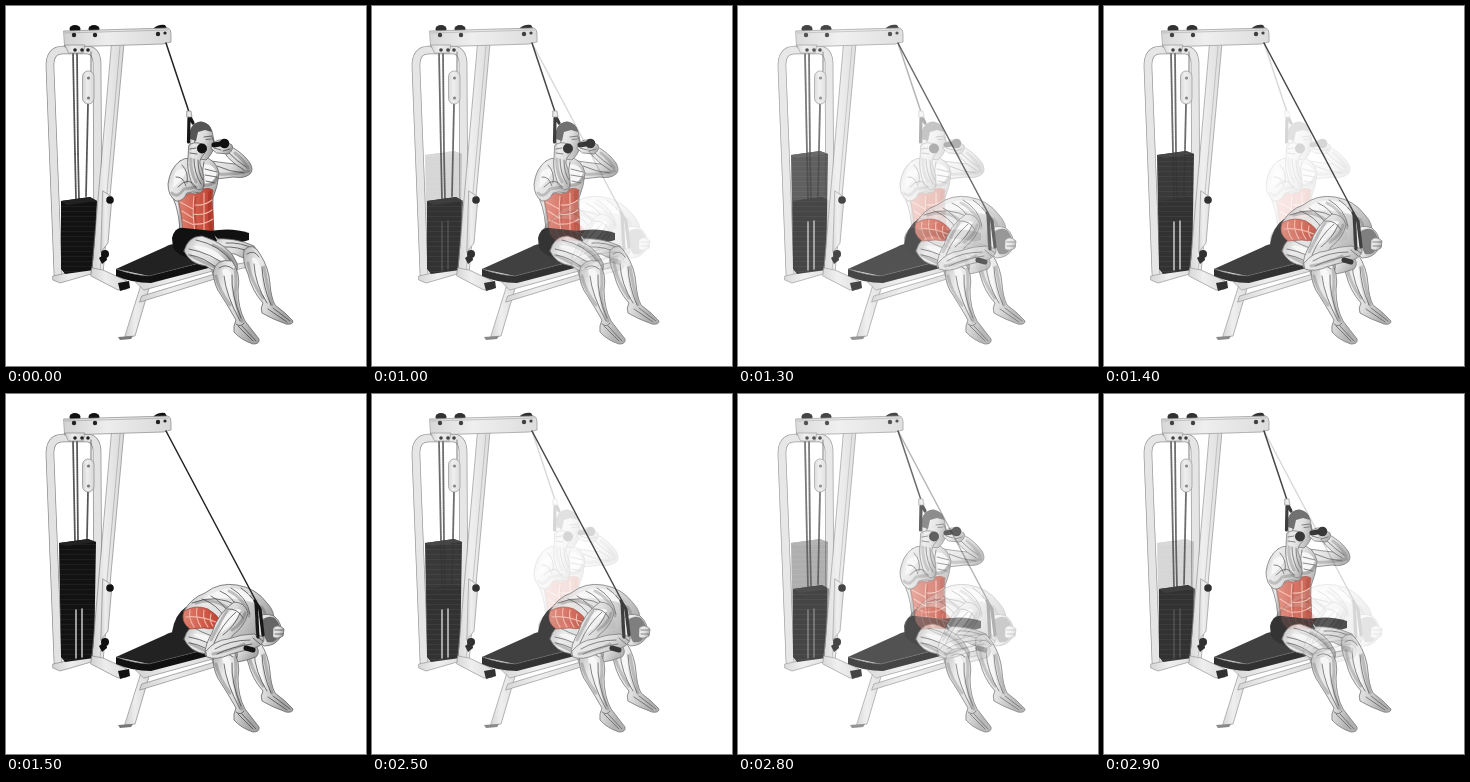
An HTML page for the animation above (3 s loop, 360 px wide and 360 px high).

```html
<!DOCTYPE html>
<html lang="en">
<head>
<meta charset="utf-8">
<title>Seated cable crunch</title>
<style>
  html, body { margin: 0; width: 100%; height: 100%; overflow: hidden; background: #fff; }
  path { stroke-linejoin: round; stroke-linecap: round; }
  .steel { fill: url(#steel); stroke: #888; stroke-width: .7; }
  .tube { fill: none; stroke: #888; stroke-width: 8.6; }
  .tube + .tube { stroke: #e2e2e2; stroke-width: 7.2; }
  .black { fill: #111; }
  .skin { fill: url(#skin); stroke: #666; stroke-width: .8; }
  .pale { fill: #f6f6f6; }
  .shade { fill: none; stroke: #444; stroke-opacity: .3; stroke-width: 3; }
  .line { fill: none; stroke: #444; stroke-width: .75; }
  .red { fill: url(#red); stroke: #8a3a30; stroke-width: .6; }
  .redline { fill: none; stroke: #f3b5a6; stroke-width: 1.1; }
  .wire { fill: none; stroke: #222; stroke-width: 1.5; }
  .rope { fill: none; stroke: #161616; stroke-width: 3.2; }
  .grip { fill: none; stroke: #111; stroke-width: 5; }
  .chain { fill: none; stroke: #555; stroke-width: 1.8; stroke-dasharray: 1.6 .8; }
  .chain path { stroke-linecap: butt; }
  .rod { stroke: #c9c9c9; stroke-width: 1.5; }

  @property --bent { syntax: "<number>"; inherits: true; initial-value: 0; }
  svg { display: block; width: 100vw; height: 100vh; animation: dissolve 3s step-end infinite; }
  /* Both poses are translucent over white during the dissolve */
  #upright { opacity: calc(1 - var(--bent)); }
  #bent { opacity: var(--bent); }
  @keyframes dissolve {
    0% { --bent: 0; }
    33.333% { --bent: .1667; }
    36.666% { --bent: .3333; }
    40% { --bent: .5; }
    43.333% { --bent: .6667; }
    46.666% { --bent: .8333; }
    50% { --bent: 1; }
    83.333% { --bent: .8333; }
    86.666% { --bent: .6667; }
    90% { --bent: .5; }
    93.333% { --bent: .3333; }
    96.666% { --bent: .1667; }
    100% { --bent: 0; }
  }
</style>
</head>
<body>
<svg viewBox="0 0 360 360">
  <defs>
    <linearGradient id="steel"><stop stop-color="#d2d2d2"/><stop offset=".4" stop-color="#ededed"/><stop offset="1" stop-color="#d8d8d8"/></linearGradient>
    <linearGradient id="skin" x2="1" y2=".4"><stop stop-color="#b0b0b0"/><stop offset=".3" stop-color="#e9e9e9"/><stop offset=".65" stop-color="#dadada"/><stop offset="1" stop-color="#a5a5a5"/></linearGradient>
    <linearGradient id="red"><stop stop-color="#dd8272"/><stop offset=".55" stop-color="#cf5a49"/><stop offset="1" stop-color="#b8402f"/></linearGradient>
    <pattern id="plates" width="40" height="5" patternUnits="userSpaceOnUse"><path fill="#121212" d="M0 0H40V5H0Z"/><path d="M0 .5H40" stroke="#242424" stroke-width=".7"/></pattern>

    <g id="rear">
      <path class="tube" d="M52 268L44 62Q43 44 57 44L82 44Q90 45 91 56L92 262"/>
      <path class="tube" d="M52 268L44 62Q43 44 57 44L82 44Q90 45 91 56L92 262"/>
      <path class="steel" d="M47 270L84 262L92 266L54 277L47 274Z"/>
      <path class="chain" d="M67 46L69 148M71 46L72 148M82 98L80 190"/>
      <path class="line" d="M85 46V66"/>
    </g>

    <g id="front">
      <rect class="steel" x="76.5" y="65" width="11.5" height="33" rx="5.7"/>
      <circle cx="82.5" cy="72" r="1.6" fill="#777"/><circle cx="82.5" cy="92" r="1.6" fill="#777"/>
      <path class="steel" d="M106 37L118 37L97 267L86 267Z"/>
      <path class="line" d="M114 40L94 266" style="stroke:#aaa"/>
      <path class="steel" d="M97 185L106 191L102 237L95 246Z"/>
      <path class="steel" d="M86 262L97 264L121 275V283L112 284L85 270Z"/>
      <path class="black" d="M112 277L123 275L124 282L114 285Z"/>
      <ellipse class="black" cx="69" cy="23" rx="5.5" ry="4"/><ellipse class="black" cx="88" cy="23" rx="5.5" ry="4"/>
      <path class="black" d="M147 23Q152 18 159 19L162 24Z"/>
      <path class="steel" d="M58 25L162 22Q165 23 165 28V36L157 38L59 41Z"/>
      <path class="line" d="M59 27L162 24" style="stroke:#aaa"/>
      <path class="steel" d="M59 39H79L77 47H63Z"/>
      <g fill="#222"><circle cx="68" cy="29" r="2.2"/><circle cx="89" cy="29" r="2.2"/><circle cx="152" cy="28" r="2.2"/><circle cx="159" cy="27" r="1.6"/><circle cx="69" cy="44" r="1.8"/><circle cx="76" cy="44" r="1.8"/><circle cx="82" cy="44" r="1.8"/></g>
      <circle class="black" cx="104" cy="194" r="3.8"/><circle class="black" cx="99" cy="248" r="4"/>
      <path class="black" d="M93 252L100 247L101 254L96 258Z"/>
      <path class="steel" d="M135 280L144 279L129 330L119 331Z"/>
      <path class="steel" d="M136 290L212 267V272L134 296Z"/>
      <path class="steel" d="M130 276L214 257V263L138 284Z"/>
      <path class="steel" d="M206 263L242 256V261L207 269Z"/>
      <path d="M112 331L127 330L125 333L114 334Z" fill="#777"/>
      <path fill="#222" d="M110 263L159 241Q166 237 175 238L214 252L143 270Z"/>
      <path class="black" d="M110 263Q126 269 143 270L214 252V259L145 277Q126 277 110 270Z"/>
      <path fill="none" stroke="#555" stroke-width=".6" d="M111 263Q128 269 143 270L205 254"/>
    </g>

    <g id="nearLeg">
      <path class="skin" d="M178 245Q182 230 196 230Q223 238 231 257Q233 267 225 270Q211 268 200 260Q184 258 178 245Z"/>
      <path class="pale" d="M187 240Q205 238 220 255Q203 254 187 240Z"/>
      <path class="shade" d="M183 249Q198 257 214 263M207 239Q225 247 228 262"/>
      <path class="line" d="M183 243Q205 247 222 261M190 234Q214 239 226 256M184 249Q198 251 212 263"/>
      <path class="skin" d="M207 266Q210 252 226 255Q235 267 232 284Q232 302 239 315Q246 324 253 333Q254 338 247 338Q235 334 228 326Q227 320 230 314Q222 300 215 289Q208 280 207 266Z"/>
      <path class="pale" d="M216 264Q222 260 225 268Q224 292 232 308Q220 290 216 264Z"/>
      <path class="shade" d="M229 263Q231 276 229 286Q230 302 236 315M210 270Q213 284 224 299"/>
      <path class="line" d="M213 262Q220 257 227 263M218 270Q220 289 234 315M226 269Q225 289 235 312M232 320L247 335M236 320L250 335M230 318Q235 322 238 317"/>
    </g>
    <g id="farShin">
      <path class="skin" d="M238 244Q247 235 254 248Q263 262 264 278Q265 291 269 299Q280 307 287 315Q287 319 280 318Q266 313 256 307Q254 302 257 297Q246 285 242 268Q236 256 238 244Z"/>
      <path class="pale" d="M246 252Q252 250 255 264Q256 282 261 296Q249 280 246 252Z"/>
      <path class="shade" d="M242 257Q245 276 257 292M258 261Q261 280 266 299"/>
      <path class="line" d="M241 248Q248 243 253 251M248 258Q249 278 261 297M256 261Q257 281 265 299M262 303L281 316M267 302L284 315"/>
    </g>
  </defs>

  <g id="upright">
    <use href="#rear"/>
    <path class="chain" d="M69 148L70 194M72 148L73 194"/>
    <path fill="url(#plates)" d="M55 195L84 191L91 195L88 264L59 268L55 263Z"/>
    <path fill="#222" d="M55 195L84 191L91 195L61 199Z"/>
    <use href="#front"/>
    <path class="wire" d="M160 37L183 106"/>

    <path class="skin" d="M205 155Q219 157 229 158Q220 151 217 144L224 140Q237 147 244 157Q248 164 244 168Q238 173 228 171L210 173Z"/>
    <path class="shade" d="M212 168Q228 169 243 165M229 147Q238 154 242 162"/>
    <path class="line" d="M211 160Q224 166 238 167M223 147Q231 155 240 161M229 158L238 164"/>
    <path class="skin" d="M174 158Q184 150 197 151Q210 153 213 167Q212 180 207 192Q206 208 208 226L174 231Q174 207 167 192Q164 172 174 158Z"/>
    <path class="pale" d="M196 159Q206 156 211 167Q208 178 198 177Z"/>
    <path class="shade" d="M193 178Q205 183 211 172M173 194Q176 211 174 225"/>
    <path class="line" d="M198 156Q195 169 198 180M199 163L211 166M199 169L211 171M200 175L209 177"/>
    <path class="red" d="M172 192Q180 186 190 188Q200 179 207 184Q205 197 207 206Q208 217 207 226L196 230L177 225Q176 210 172 192Z"/>
    <path class="shade" d="M204 186Q202 207 205 226M189 191Q187 208 191 227" style="stroke:#8c1d12"/>
    <path class="redline" d="M198 187Q198 207 198 227M188 190Q186 207 189 226M189 199Q198 200 206 194M187 208Q198 210 206 204M188 218Q198 219 207 213M174 196L187 203M176 205L187 212M177 214L188 219"/>

    <path class="black" d="M204 225Q226 221 243 227V234Q231 238 219 240Z"/>
    <path class="skin" d="M206 233Q229 231 248 240Q254 247 249 253Q239 254 229 248L213 247Z"/>
    <path class="line" d="M217 241Q232 240 246 247M220 237Q235 236 248 243"/>
    <use href="#farShin"/>
    <path class="black" d="M166 232Q169 220 178 222L207 225L211 235L185 252Q172 250 167 242Z"/>
    <use href="#nearLeg"/>

    <path class="skin" d="M184 130Q184 117 196 116Q206 119 207 130L209 139Q206 149 200 154L188 152Q183 139 184 130Z"/>
    <path fill="#555" d="M184 133Q182 117 195 115.500Q205 117 206 126L199 124L192 126L190 135Z"/>
    <path class="line" d="M198 131L206 130M200 133.500L205 133M206 131L209 139M189 134Q187 138 190 141"/>
    <path class="skin" d="M174 155Q184 148 191 158L197 172Q200 183 194 187Q186 185 181 187Q177 196 170 195Q162 190 162 178Q164 162 174 155Z"/>
    <path class="skin" d="M183 139Q188 135 196 138L199 147Q193 153 194 158Q200 171 197 182Q192 187 186 178Q180 162 182 151Z"/>
    <path class="pale" d="M169 167Q176 159 181 165Q176 175 167 182Z"/>
    <path class="shade" d="M166 187Q171 193 178 183L190 181M185 153Q184 165 190 176"/>
    <path class="line" d="M170 171Q177 170 180 180M172 181Q183 169 190 181M176 159Q183 166 181 177M188 153Q188 167 195 178M192 154Q192 167 197 174"/>
    <path class="rope" d="M183 112L182.500 136M184 111L187 117"/>
    <path class="steel" d="M181 105H185L186 111H181Z"/>
    <path class="skin" d="M205 142Q208 133 216 134L226 139Q228 144 222 148L211 147Z"/>
    <path class="grip" d="M208 139L219 137"/>
    <circle class="black" cx="196" cy="142.500" r="5"/><circle class="black" cx="218.500" cy="137.500" r="4.800"/>
    <path class="line" d="M184 143L190 142M184 147L191 148M208 142L215 144M217 145L224 143"/>
  </g>

  <g id="bent">
    <use href="#rear"/>
    <path fill="url(#plates)" d="M53 149L82 145L90 148L88 264L59 268L55 263Z"/>
    <path fill="#222" d="M53 149L82 145L90 148L60 152Z"/>
    <path class="rod" d="M70 216V264M76 215V263"/>
    <use href="#front"/>

    <use href="#farShin"/>
    <path class="skin" d="M211 249L247 248Q256 257 250 263Q240 267 226 269Z"/>
    <path fill="#222" d="M166 238Q169 220 180 213L193 218L204 240L186 252Q168 250 166 238Z"/>
    <use href="#nearLeg"/>
    <path class="skin" d="M178 217Q185 204 199 199Q213 188 231 191Q250 194 261 209Q269 217 268 228L248 244L218 247L196 238Q182 233 178 217Z"/>
    <path class="pale" d="M199 204Q218 190 236 196Q249 201 257 212Q235 202 199 204Z"/>
    <path class="red" d="M178 217Q190 210 202 215Q211 220 216 229Q209 237 198 234L184 235Q174 228 178 217Z"/>
    <path class="redline" d="M184 216Q182 224 188 233M191 214Q189 224 195 233M198 216Q196 225 202 233M205 220Q203 227 207 232M180 223Q194 221 212 229"/>
    <path class="shade" d="M190 209Q209 203 224 216M223 197Q238 204 243 222M245 202Q258 211 260 224"/>
    <path class="line" d="M186 209Q210 199 232 212M196 205Q211 210 219 224M205 202Q216 208 224 220M214 197Q228 203 232 216M225 194Q241 203 244 220M235 194Q251 205 254 220"/>
    <path class="skin" d="M250 226Q256 217 268 222Q277 229 275 242Q270 252 258 252Q248 246 250 226Z"/>
    <path fill="#666" d="M254 229Q260 220 269 224Q276 232 274 241Q269 250 261 248Q257 241 254 229Z"/>
    <path class="skin" d="M228 208Q239 208 242 219Q239 232 227 241Q219 251 215 260Q207 267 199 261Q199 250 206 239Q211 220 228 208Z"/>
    <path class="skin" d="M200 257Q209 246 222 245Q235 240 248 240L258 243Q259 250 249 254Q236 257 225 260Q210 267 201 263Z"/>
    <path class="pale" d="M216 226Q226 212 235 216Q231 229 213 240Z"/>
    <path class="shade" d="M205 246Q215 226 221 217M207 260Q224 257 238 250M226 236Q237 229 239 219"/>
    <path class="line" d="M208 249Q216 230 230 218M217 241Q229 232 234 219M209 255Q224 246 244 246M211 260Q225 253 246 250M221 215Q232 214 237 224"/>
    <path class="skin" d="M267 234Q272 229 278 235L277 242Q271 246 267 243Z"/>
    <path class="line" d="M269 236L277 236M269 240L277 240M250 242L257 247M247 244L254 250"/>
    <path class="wire" d="M160 37L250 207"/>
    <path class="rope" d="M249 207L254 215L257 241M250 209L252 243"/>
    <path class="grip" d="M240 254L247 256"/>
  </g>
</svg>
</body>
</html>
```
